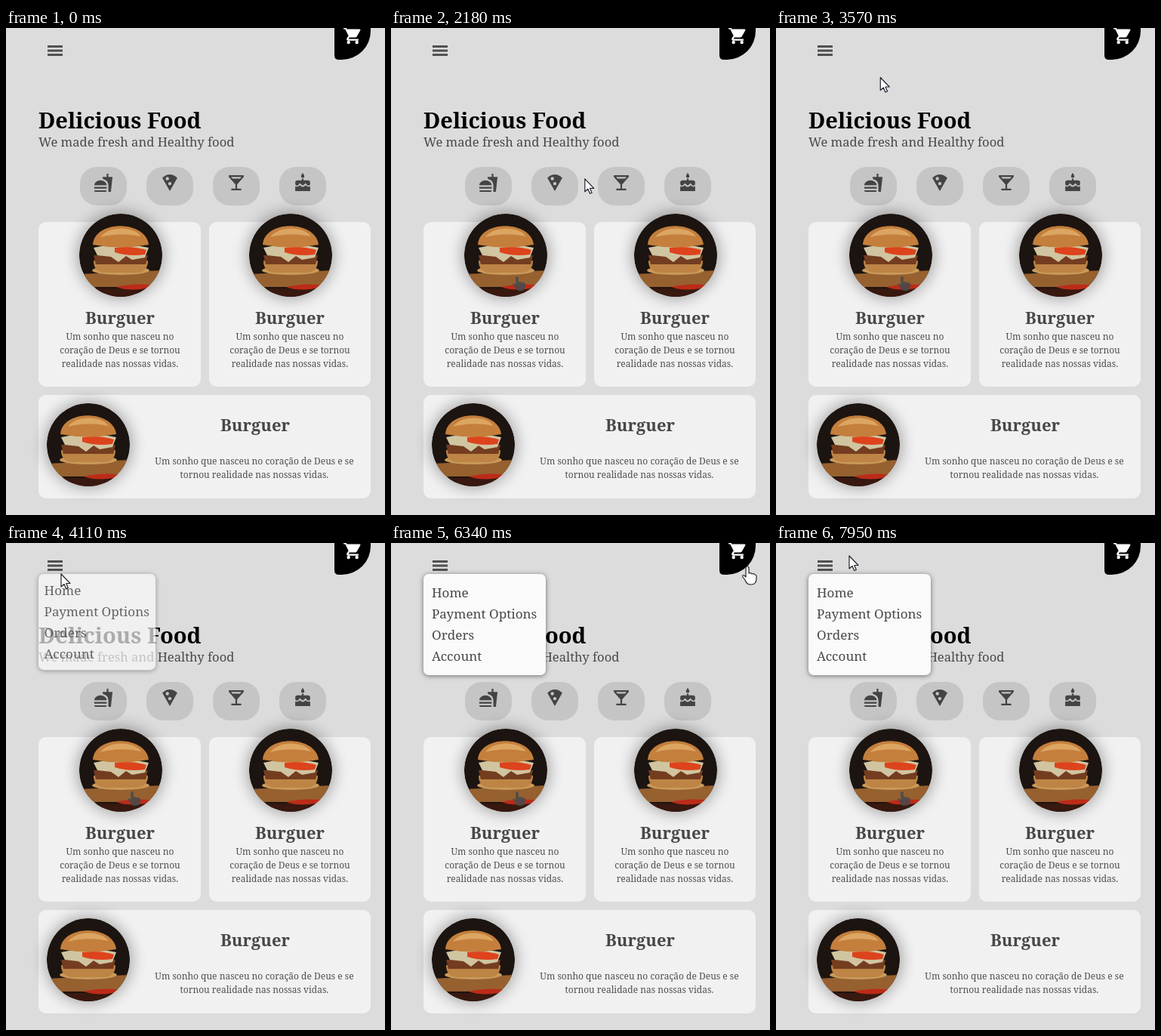
An HTML page for the animation above (8000 ms loop, 502 by 645 pixels).

```html
<!DOCTYPE html>
<html lang="en">
<head>
<meta charset="utf-8">
<title>Delicious Food</title>
<style>
html, body { margin: 0; width: 100%; height: 100%; overflow: hidden; background: #dcdcdc; }
svg { display: block; width: 502px; height: 645px; }
text { font-family: "Noto Serif", "Liberation Serif", serif; fill: #484848; }
.title { font-size: 29.1px; font-weight: 700; fill: #000; }
.sub { font-size: 16.6px; }
.name { font-size: 22px; font-weight: 700; text-anchor: middle; }
.small { font-size: 12px; text-anchor: middle; fill: #505050; }
.item { font-size: 17.1px; }
.icon { fill: #444; fill-rule: evenodd; }
.cursor { fill: #fff; stroke: #23232f; stroke-width: 1.2; stroke-linejoin: round; }
#box { filter: drop-shadow(0 1px 3px rgba(0, 0, 0, .5)); }
.glow { opacity: .34; filter: blur(10px); }
</style>
</head>
<body>
<svg viewBox="0 0 502 645">
  <defs>
    <clipPath id="disc"><circle r="55"/></clipPath>
    <g id="burger">
      <circle class="glow" r="57"/>
      <g clip-path="url(#disc)">
        <circle r="55" fill="#1c1410"/>
        <path d="M-55 25L55 20V42H-55z" fill="#96602f"/>
        <path d="M-55 44H55V55H-55z" fill="#38180f"/>
        <path d="M-6 42Q18 36 48 40 16 50-6 42z" fill="#bc2b18"/>
        <ellipse cy="20" rx="38" ry="6" fill="#c99a5a"/>
        <path d="M-36 7H36Q36 23 20 23H-20Q-36 23-36 7z" fill="#bd8445"/>
        <path d="M-36 0H36L33 12H-33z" fill="#743d20"/>
        <path d="M-36-10Q0-18 37-10L32 3 15 6 7 1-3 9-13 2-31 0z" fill="#d0c5a0"/>
        <path d="M-8-10Q14-13 34-7L32-1Q10 2-8-4z" fill="#dd431c"/>
        <path d="M-37-14C-35-47 33-47 37-14Q0-7-37-14z" fill="#c47f3c"/>
        <path d="M-27-24C-16-39 16-39 27-25Q0-31-27-24z" fill="#dca562"/>
      </g>
    </g>
    <path id="hand" d="M-2 14V2a2 2 0 0 1 4 0V9q3-1 4 1 3-1 4 1 2 0 2 2V16q0 8-7 8H4Q-1 24-3 18L-6 14q-1-3 2-2z"/>
  </defs>

  <path d="M55 24.500H75M55 30H75M55 35.500H75" stroke="#505050" stroke-width="2.800"/>
  <path d="M435 0H483V4A38 38 0 0 1 445 42H441Q435 42 435 36z"/>
  <g transform="translate(446 -3) scale(1.1)" fill="#fff">
    <path d="M1 2H4L5 4H20Q22 4 21 6L17 13Q17 14 15 14H8L7 16H19V18H7Q4 18 5 15L7 12 3 4H1z"/>
    <circle cx="7" cy="20" r="2"/><circle cx="17" cy="20" r="2"/>
  </g>

  <text class="title" x="43" y="133">Delicious Food</text>
  <text class="sub" x="43" y="157">We made fresh and Healthy food</text>

  <g id="buttons"></g>
  <g id="cards"></g>
  <use id="ghost" href="#hand" transform="translate(167 329) scale(.92 .8)" fill="#454a4d" opacity=".85"/>

  <g id="menu">
    <rect id="box" x="43" y="41" rx="7" fill="#fafafa"/>
    <g id="items"></g>
  </g>

  <g id="pointer" class="cursor">
    <use id="finger" href="#hand"/>
    <path id="arrow" d="M0 0V17L4 13.500 6.700 19.500 9.300 18.400 6.700 12.500H12z"/>
  </g>
</svg>
<script>
const $ = id => document.getElementById(id);
const lines = (cls, x, y, gap, list) => list.map((s, i) =>
  `<text class="${cls}" x="${x}" y="${y + i * gap}">${s}</text>`).join('');
const rect = ([x, y, w, h], r, fill) =>
  `<rect x="${x}" y="${y}" width="${w}" height="${h}" rx="${r}" fill="${fill}"/>`;
const burger = (x, y) => `<use href="#burger" x="${x}" y="${y}"/>`;

const dot = (x, y) => `M${x - 2} ${y}a2 2 0 0 0 4 0a2 2 0 0 0-4 0z`;
const icons = [
  // burger and cup, pizza, cocktail, cake
  'M1 15a7.500 6 0 0 1 15 0zM1 17h15v2H1zM1 21h15q0 2-2 2H3q-2 0-2-2zM11 5h5V1h2v4h5l-2 18h-3V15q0-6-6.500-7.600z',
  'M3 6Q12-2 21 6L12 22z' + dot(9, 7) + dot(12, 13),
  'M21 5V3H3v2l8 9v5H6v2h12v-2h-5v-5zM7.500 7L5.700 5h12.600l-1.800 2z',
  'M12 0q4 6 0 6t0-6zM3 12q0-3 3-3h5V7h2v2h5q3 0 3 3 0 5-4 2.500l-1.500-2-3.500 3-3.500-3-1.500 2Q3 17 3 12zM3 16.400q3 1 5.600-1.500 3.400 4 6.800 0 2.600 2.500 5.600 1.500V22H3z'
];
const buttons = icons.map((_, i) => [98 + 88 * i, 184, 62, 51]);
const cards = [[43, 257, 215, 218], [269, 257, 214, 218], [43, 486, 440, 137]];
const cart = [435, 0, 48, 42];
const menuArea = [43, 52, 162, 123];

$('buttons').innerHTML = buttons.map((b, i) => rect(b, 22, '#c5c5c5') +
  `<path class="icon" transform="translate(${b[0] + 17.8} 191.8) scale(1.1)" d="${icons[i]}"/>`).join('');

const tall = x => burger(x + 1, 301) + lines('name', x, 392, 0, ['Burguer']) +
  lines('small', x, 413, 18, ['Um sonho que nasceu no', 'coração de Deus e se tornou', 'realidade nas nossas vidas.']);
$('cards').innerHTML = cards.map(c => rect(c, 10, '#f1f1f1')).join('') + tall(151) + tall(376) +
  burger(109, 552) + lines('name', 330, 534, 0, ['Burguer']) +
  lines('small', 329, 578, 18, ['Um sonho que nasceu no coração de Deus e se', 'tornou realidade nas nossas vidas.']);
$('items').innerHTML = lines('item', 43, 61, 28, ['Home', 'Payment Options', 'Orders', 'Account']);

// Pointer stops: [tick, x, y], straight lines between them
const stops = [
  [0, 410, 632], [10, 92, 200], [11, 120, 198], [21, 272, 200], [29, 390, 215],
  [32, 352, 139], [40, 67, 41], [45, 73, 41], [57, 96, 90], [69, 87, 147],
  [74, 472, 31], [79, 466, 10], [90, 351, 75], [95, 97, 17]
];
function pointerAt(k) {
  const next = stops.findIndex(s => s[0] > k);
  if (next < 0) return stops.at(-1).slice(1);
  const [a, x, y] = stops[next - 1], [b, u, v] = stops[next];
  const f = (k - a) / (b - a);
  return [x + (u - x) * f, y + (v - y) * f];
}

const inside = (x, y, [l, t, w, h]) => x >= l && x <= l + w && y >= t && y <= t + h;
const show = (id, on) => { $(id).style.display = on ? '' : 'none'; };
const set = (id, attrs) => {
  for (const name in attrs) $(id).setAttribute(name, attrs[name]);
};
const backs = $('buttons').querySelectorAll('rect');

function draw(now) {
  // The screen refreshes about 13 times a second
  const k = Math.floor((now % 8000 - 643) / 76.85);
  const [x, y] = k < 0 ? [-50, -50] : pointerAt(k);
  const open = Math.max(0, Math.min(1, (k - 42.9) / 3.05));
  const pad = 11 * open;

  backs.forEach((b, i) => b.setAttribute('fill', inside(x, y, buttons[i]) ? '#fff' : '#c5c5c5'));

  show('menu', open > 0);
  set('box', { width: 140 + 2 * pad, height: 112 + 2 * pad, opacity: open });
  set('items', { transform: `translate(${pad} ${pad})`, opacity: Math.sqrt(open) });

  const targets = [...buttons, ...cards, cart];
  if (open === 1) targets.push(menuArea);
  const link = targets.some(r => inside(x, y, r));
  show('pointer', k >= 0);
  show('finger', link);
  show('arrow', !link);
  set('pointer', { transform: `translate(${x} ${y})` });
  show('ghost', k > 6);
  requestAnimationFrame(draw);
}
draw(performance.now());
</script>
</body>
</html>
```
